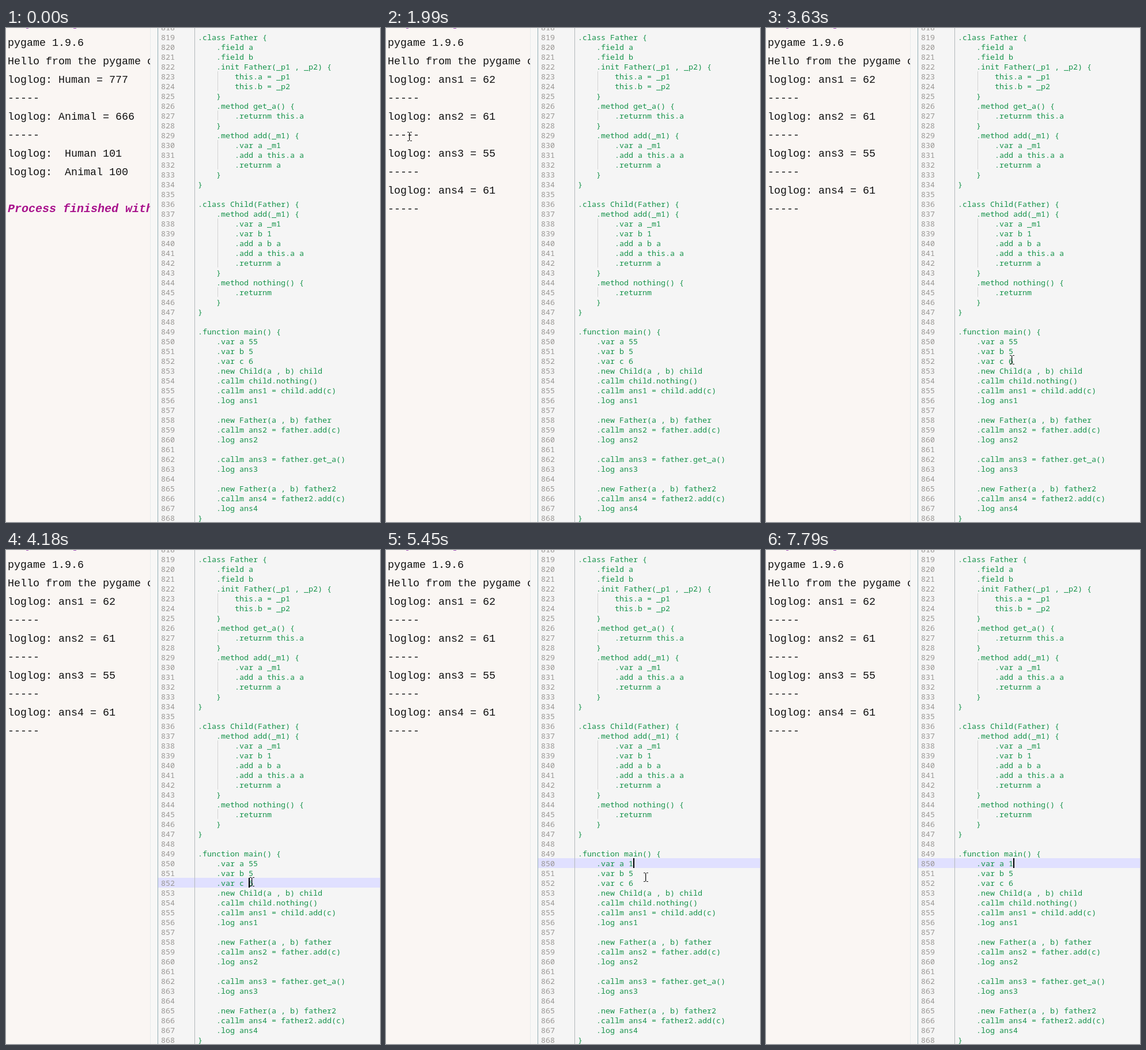
An HTML page with a canvas for the animation above (8000 ms loop, 649 px wide and 856 px high).

```html
<!DOCTYPE html>
<html lang="en">
<head>
<meta charset="utf-8">
<title>Console and code editor</title>
<style>
html, body { margin: 0; width: 100%; height: 100%; overflow: hidden; background: #f5f5f5; }
canvas { display: block; }
</style>
</head>
<body>
<canvas id="stage" width="649" height="856"></canvas>
<script>
const ctx = document.getElementById('stage').getContext('2d');
const LOOP = 8000;
const ROW = 17, COL = 8, CODE_X = 333, FIRST = 818, TOP = -10;
const CODE_FONT = '13.333px "Noto Sans Mono", monospace';
const LOG_FONT = '18.333px "Liberation Mono", monospace';
const EXIT_FONT = 'italic bold 20px "Liberation Mono", monospace';

const code = `
.class Father {
    .field a
    .field b
    .init Father(_p1 , _p2) {
        this.a = _p1
        this.b = _p2
    }
    .method get_a() {
        .returnm this.a
    }
    .method add(_m1) {
        .var a _m1
        .add a this.a a
        .returnm a
    }
}

.class Child(Father) {
    .method add(_m1) {
        .var a _m1
        .var b 1
        .add a b a
        .add a this.a a
        .returnm a
    }
    .method nothing() {
        .returnm
    }
}

.function main() {
    .var a 55
    .var b 5
    .var c 6
    .new Child(a , b) child
    .callm child.nothing()
    .callm ans1 = child.add(c)
    .log ans1

    .new Father(a , b) father
    .callm ans2 = father.add(c)
    .log ans2

    .callm ans3 = father.get_a()
    .log ans3

    .new Father(a , b) father2
    .callm ans4 = father2.add(c)
    .log ans4
}`.split('\n');

const intro = ['pygame 1.9.6', 'Hello from the pygame community.'];
const rule = '-----';
const oldLog = [...intro, 'loglog: Human = 777', rule, 'loglog: Animal = 666', rule,
  'loglog:  Human 101', 'loglog:  Animal 100'];
const newLog = [...intro, ...[62, 61, 55, 61].flatMap((v, i) => [`loglog: ans${i + 1} = ${v}`, rule])];

// Mouse path: time, x, y
const path = [
  [1990, 41, 188], [2430, 376, 579], [2560, 387, 565],
  [2800, 387, 565], [3140, 430, 553],
  [3290, 430, 553], [3630, 427, 575],
  [4480, 427, 575], [4550, 431, 553],
  [4850, 431, 553], [4910, 431, 545],
  [5320, 431, 545], [5450, 451, 567],
  [5560, 451, 567], [6100, 4, 126], [6250, -12, 116]
];

// Value typed on line 850
const typed = [[0, '55'], [5070, '5'], [5130, ''], [5320, '1']];

const rowTop = n => TOP + (n - FIRST) * ROW;
const latest = (list, t) => list.filter(e => e[0] <= t).pop()[1];

function box(x, y, w, h, color) {
  ctx.fillStyle = color;
  ctx.fillRect(x, y, w, h);
}

function mouseAt(t) {
  const i = path.findIndex(p => p[0] > t);
  if (i < 1) return null;
  const [t0, x0, y0] = path[i - 1], [t1, x1, y1] = path[i];
  const k = (t - t0) / (t1 - t0), e = k * k * (3 - 2 * k);
  return [Math.round(x0 + (x1 - x0) * e), Math.round(y0 + (y1 - y0) * e)];
}

function drawMouse([x, y]) {
  for (const dy of [-8, 7]) {
    box(x - 4, y + dy, 3, 1, '#111');
    box(x + 1, y + dy, 3, 1, '#111');
  }
  box(x - 1, y - 7, 1, 14, '#111');
  box(x, y - 7, 1, 14, 'rgba(0,0,0,.25)');
}

function drawLog(t) {
  ctx.save();
  ctx.beginPath();
  ctx.rect(0, 0, 250, 856);
  ctx.clip();
  box(0, 0, 250, 856, '#faf6f3');
  box(35, 0, 4, 1, '#a050b8');
  box(117, 0, 5, 1, '#a050b8');
  ctx.font = LOG_FONT;
  ctx.fillStyle = '#111';
  const lines = t < 340 ? oldLog : t < 990 ? [] : newLog;
  lines.forEach((s, i) => ctx.fillText(s, 3, 31 + i * 32));
  if (t < 340) {
    ctx.font = EXIT_FONT;
    ctx.fillStyle = '#a8128c';
    ctx.fillText('Process finished with exit code 0', 3, 319);
  }
  ctx.restore();
}

function drawCode(t) {
  box(250, 0, 399, 856, '#f5f5f5');
  box(250, 0, 14, 856, '#f8f7f6');
  box(250, 0, 1, 856, '#e6eaec');

  const active = t < 4180 ? 0 : t < 5010 ? 852 : 850;
  if (active) box(264, rowTop(active), 385, ROW, '#e0e0ff');
  box(263, 0, 1, 856, '#93aeb5');
  box(327, 0, 1, 856, '#b2b8ba');

  const value = latest(typed, t);
  ctx.font = CODE_FONT;
  code.forEach((line, i) => {
    const n = FIRST + i, y = rowTop(n);
    if (line.startsWith('        ')) box(367, y, 1, ROW, '#d2d2d2');
    ctx.fillStyle = '#999693';
    ctx.fillText(n, 269, y + 14);
    ctx.fillStyle = '#16934b';
    ctx.fillText(n === 850 ? line.replace('55', value) : line, CODE_X, y + 14);
  });

  const blink = (t >= 6130 && t < 6250) || (t >= 7050 && t < 7170);
  if (active && !blink) {
    const col = 11 + (active === 850 ? value.length : 0);
    box(CODE_X + col * COL, rowTop(active), 2, ROW, '#000');
  }
}

function draw(now) {
  const t = now % LOOP;
  drawLog(t);
  drawCode(t);
  const mouse = mouseAt(t);
  if (mouse) drawMouse(mouse);
  requestAnimationFrame(draw);
}
requestAnimationFrame(draw);
</script>
</body>
</html>
```
